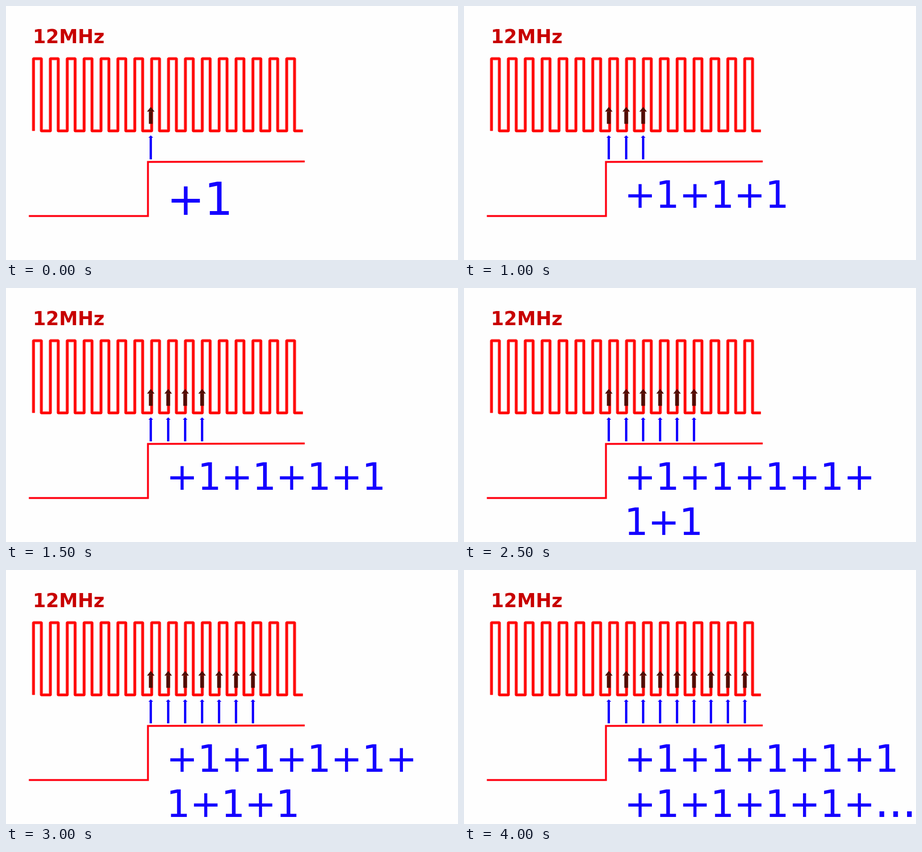
Animation of 960 by 540 pixels, one loop 4.5 s. Source, as an HTML page with a canvas:

```html
<!DOCTYPE html>
<html lang="en">
<head>
<meta charset="utf-8">
<title>Counting clock edges</title>
<style>
  html, body { margin: 0; width: 100%; height: 100%; overflow: hidden; background: #fefefe; }
  canvas { display: block; }
</style>
</head>
<body>
<canvas id="stage" width="960" height="540"></canvas>
<script>
const ctx = document.getElementById('stage').getContext('2d');
const STEP = 500, STEPS = 9;
const RED = '#ff0000', BLUE = '#1400ff', BROWN = '#500c02';
const FACE = '"DejaVu Sans", sans-serif';
const CLOCK = { left: 58.4, top: 112, bottom: 265.5, period: 35.85, high: 16.7, pulses: 16 };
const ARROW_LEFT = 307.9, ARROW_GAP = 36.1;

function line(points, width, color, join) {
  ctx.beginPath();
  for (const [x, y] of points) ctx.lineTo(x, y);
  ctx.lineWidth = width;
  ctx.strokeStyle = color;
  ctx.lineJoin = join;
  ctx.stroke();
}

// Letter spacing is in em, so it holds for every size.
function text(str, x, y, size, color, weight = 'normal', spacing = 0) {
  ctx.font = `${weight} ${size}px ${FACE}`;
  ctx.letterSpacing = spacing * size + 'px';
  ctx.fillStyle = color;
  ctx.fillText(str, x, y);
}

function arrow(x, top, bottom, headWidth, headHeight, shaft, color) {
  ctx.fillStyle = color;
  ctx.beginPath();
  ctx.moveTo(x, top);
  ctx.lineTo(x + headWidth / 2, top + headHeight);
  ctx.lineTo(x - headWidth / 2, top + headHeight);
  ctx.fill();
  ctx.fillRect(x - shaft / 2, top + headHeight, shaft, bottom - top - headHeight);
}

function drawClock() {
  const { left, top, bottom, period, high, pulses } = CLOCK;
  const points = [];
  for (let i = 0; i < pulses; i++) {
    const rise = left + i * period, fall = rise + high;
    points.push([rise, bottom], [rise, top], [fall, top], [fall, bottom]);
  }
  points.push([630.5, bottom]);
  line(points, 7.5, 'rgba(255,0,0,0.35)', 'bevel');
  line(points, 5.2, RED, 'round');
}

function drawArrows(count) {
  for (let i = 0; i < count; i++) {
    const x = Math.floor(ARROW_LEFT + i * ARROW_GAP) + 0.5;
    arrow(x, 214.5, 250.5, 16, 10, 8, BROWN);
    arrow(x, 275, 326, 10, 5, 5, BLUE);
  }
}

function drawSum(count) {
  const sum = '+1'.repeat(count);
  if (count === 1) {
    text(sum, 341.5, 444, 96, BLUE, 'normal', -0.0095);
    return;
  }
  const row = (str, y) => text(str, 340.5, y, 80, BLUE, 'normal', -0.0095);
  const full = count === STEPS;
  const cut = count < 8 ? 9 : 10;
  row(sum.slice(0, cut), 429);
  row(sum.slice(cut) + (full ? '+' : ''), 525);
  if (full) text('...', 872.3, 525, 96, BLUE, 'normal', -0.0135);
}

function draw(time) {
  const count = Math.floor(time / STEP) % STEPS + 1;
  ctx.fillStyle = '#fefefe';
  ctx.fillRect(0, 0, 960, 540);
  text('12MHz', 57, 79, 40, '#c80000', 'bold');
  drawClock();
  line([[48.5, 446.5], [301.5, 446.5], [301.5, 331.5], [634.5, 330.5]], 4, '#ff0010', 'miter');
  drawArrows(count);
  drawSum(count);
}

const start = performance.now();
function tick() {
  draw(performance.now() - start);
  requestAnimationFrame(tick);
}
tick();
</script>
</body>
</html>
```
